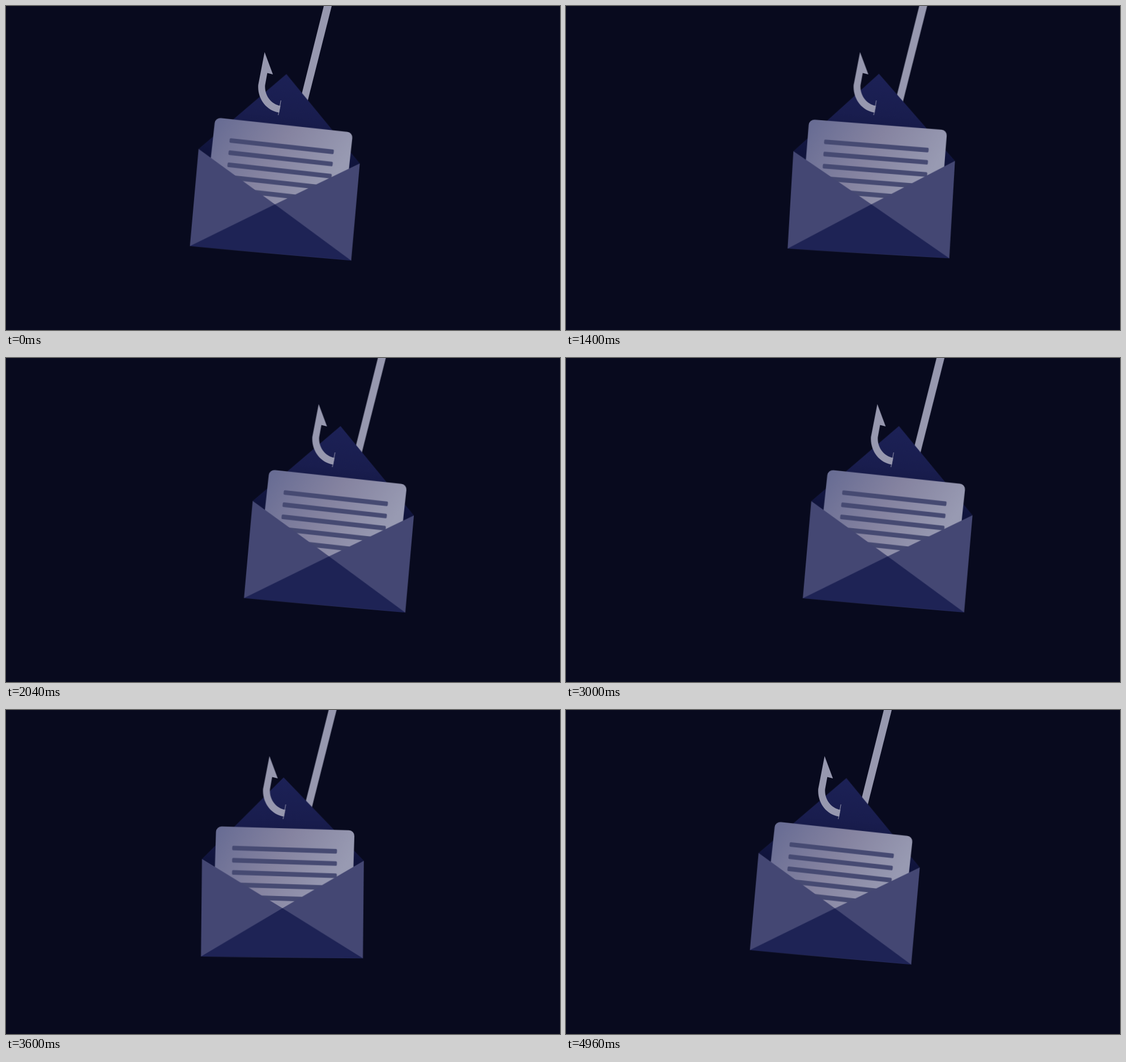
An HTML page for the animation above (6000 ms loop, 978x573 px).

```html
<!DOCTYPE html>
<html lang="en">
<head>
<meta charset="utf-8">
<title>Hooked letter</title>
<style>
html, body {
  margin: 0;
  width: 100%;
  height: 100%;
  overflow: hidden;
  background: #080a1e;
}
svg { display: block; width: 978px; height: 573px; }

.rig { animation: slide 6s infinite; }
.envelope { transform-origin: 474px 290px; animation: tilt 6s infinite; }
.metal { fill: #9798af; }

/* Each leg lasts one second with the default ease */
@keyframes slide {
  0%, 17% { transform: translateX(0); }
  33.667%, 49.333% { transform: translateX(95.5px); }
  66%, 100% { transform: translateX(0); }
}
@keyframes tilt {
  0%, .333% { transform: rotate(4.95deg); }
  17% { transform: rotate(0deg); }
  33.667%, 49.333% { transform: rotate(4.95deg); }
  66% { transform: rotate(0deg); }
  82.667%, 100% { transform: rotate(4.95deg); }
}
</style>
</head>
<body>
<svg viewBox="0 0 978 573">
  <defs>
    <linearGradient id="flap" gradientUnits="userSpaceOnUse" x1="0" y1="119" x2="0" y2="265">
      <stop offset="0" stop-color="#1c2156"/>
      <stop offset=".5" stop-color="#191d4e"/>
      <stop offset="1" stop-color="#10143c"/>
    </linearGradient>
    <linearGradient id="paper" gradientUnits="userSpaceOnUse" x1="365" y1="225" x2="560" y2="330">
      <stop offset="0" stop-color="#696d94"/>
      <stop offset=".5" stop-color="#8583a0"/>
      <stop offset="1" stop-color="#989ab2"/>
    </linearGradient>
  </defs>

  <g class="rig">
    <path class="metal" d="M561.5 -2 H575.5 L529 182 H515.5 Z"/>

    <g class="envelope">
      <path fill="url(#flap)" d="M480.3 119.2 L623 265.4 L480 352 L337.3 264.6 Z"/>
      <rect fill="url(#paper)" x="361.8" y="209.2" width="244.4" height="160" rx="10" transform="rotate(1.3 483 209)"/>
      <g fill="#464a72">
        <rect id="line" x="390.5" y="240.6" width="185" height="8.2" rx="2" transform="rotate(1.4 390.5 244.7)"/>
        <use href="#line" y="21.6"/>
        <use href="#line" y="43.2"/>
        <use href="#line" y="64.8"/>
        <use href="#line" y="86.4"/>
      </g>
      <path fill="#444773" d="M337.3 264.6 L480 350.5 L623 265.4 L622.7 438 L336.8 437 Z"/>
      <path fill="#1e2355" d="M336.8 437 L480 350.5 L622.7 438 Z"/>
    </g>

    <path class="metal" d="M456.5 81.5 L471.2 121 L461.3 118.6 L457.4 140 C456 158 468 174 484.6 176.6 L482.3 188.6 C459 185 443.5 163 445.3 139.5 Z"/>
    <path stroke="#9798af" d="M485.3 167 L480.6 193"/>
  </g>
</svg>
</body>
</html>
```
